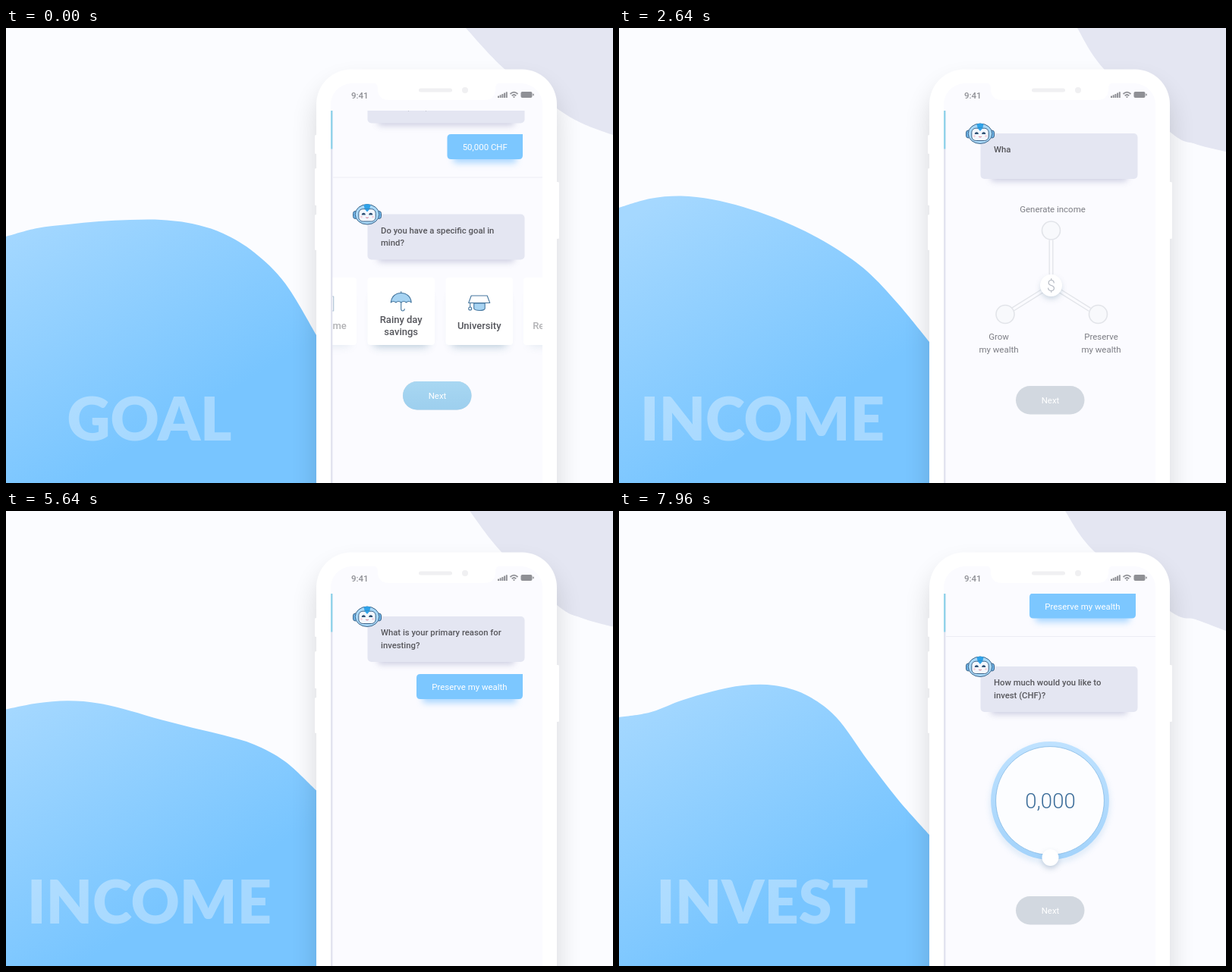
An HTML page that plays this animation: 800x600 px, repeating every 8 s.

```html
<!DOCTYPE html>
<html lang="en">
<head>
<meta charset="utf-8">
<title>Investment onboarding chat</title>
<style>
  html, body { margin: 0; width: 100%; height: 100%; overflow: hidden; background: #fbfcff; }
  svg { display: block; width: 800px; height: 600px; }
  text { font-family: Roboto, sans-serif; font-size: 11.45px; white-space: pre; }
  .mid { text-anchor: middle; }
  .question { fill: #57575c; font-weight: 500; font-size: 11.3px; }
  .white { fill: #fff; }
  .card { fill: #55565c; font-size: 13px; font-weight: 500; }
  .label { fill: #7c7d84; }
  .title { font-family: Lato, sans-serif; font-weight: 900; font-size: 79px; fill: #fff; }
  .icon { fill: none; stroke: #46779f; stroke-width: 1.1; stroke-linejoin: round; stroke-linecap: round; }
  .icon .tint { fill: #a6d3f2; }
</style>
</head>
<body>
<svg id="stage" viewBox="0 0 800 600"></svg>
<script>
const LOOP = 8000, STEP = 4540;            // STEP: delay between the two page changes
const SCROLLS = [286, 106.5];
const QUESTIONS = {
  invest: ['How much would you like to', 'invest (CHF)?'],
  goal: ['Do you have a specific goal in', 'mind?'],
  reason: ['What is your primary reason for', 'investing?'],
};

// ---- markup helpers ----
const text = (x, y, cls, str, extra = '') => `<text x="${x}" y="${y}" class="${cls}" ${extra}>${str}</text>`;
const rect = (x, y, w, h, r, fill, extra = '') =>
  `<rect x="${x}" y="${y}" width="${w}" height="${h}" rx="${r}" fill="${fill}" ${extra}/>`;
const circle = (x, y, r, fill, extra = '') => `<circle cx="${x}" cy="${y}" r="${r}" fill="${fill}" ${extra}/>`;
const group = (id, body) => `<g id="${id}">${body}</g>`;
const divider = (y, id) => rect(431, y - .5, 276, 1, 0, '#ededf5', id ? `id="${id}"` : '');

const question = (y, lines, id) =>
  rect(490, y + 46, 180, 17, 4, '#8487b4', 'opacity=".4" filter="url(#blur4)"') +
  rect(476.5, y, 207, 60, 5, '#e4e6f2') +
  lines.map((line, i) => text(494, y + 25 + 16.5 * i, 'question', line, id ? `id="${id}${i}"` : '')).join('') +
  `<use href="#robot" x="476" y="${y}"/>`;

const bubble = (y, w, str) => {
  const x = 681 - w;
  return rect(x + 8, y + 14, w - 16, 24, 4, '#5cb4ff', 'opacity=".5" filter="url(#blur4)"') +
    `<path d="M${x + 5} ${y}H681V${y + 28}q0 5-5 5H${x + 5}q-5 0-5-5V${y + 5}q0-5 5-5z" fill="#7cc7ff"/>` +
    text(x + w / 2, y + 21, 'white mid', str);
};

const nextButton = (y, blue, id = '') =>
  rect(523, y, 90.5, 37.5, 18.75, '#d2d8e0') +
  rect(523, y, 90.5, 37.5, 18.75, 'url(#button)', `id="${id}" opacity="${blue}"`) +
  text(568.5, y + 23.3, 'white mid', 'Next');

const card = (x, lines, icon, faded) =>
  rect(x + 8, 352, 72, 68, 4, '#5f8aa6', `opacity="${faded ? .15 : .45}" filter="url(#blur6)"`) +
  rect(x, 329, 88.5, 89, 4, '#fff') +
  `<g opacity="${faded ? .45 : 1}"><g class="icon" transform="translate(${x + 44.2} 361)">${icon}</g>` +
  lines.map((line, i) => text(x + 44.2, 399.5 - 8 * lines.length + 16 * i + 5.5, 'card mid', line)).join('') + '</g>';

const ICONS = {
  house: '<path d="M-14-7H14V12H-14z"/>',
  umbrella: '<path class="tint" d="M-13.5 1C-13-7-7-11.500 0-11.500S13-7 13.500 1q-3.300-3-6.700 0Q3.500-2 0 1q-3.500-3-6.800 0-3.400-3-6.700 0z"/><path d="M0-13.500v2M0 1V9.500q0 2.500 2.200 2.500T4.500 9.500"/>',
  cap: '<path class="tint" d="M-7 2H7.500V9q-1 2.500-7 2.500T-7 9z"/><path fill="#fff" d="M-10.500-8H10.500L14 1.500H-14z"/><path d="M-12 2v5"/><circle cx="-12" cy="9" r="2"/>',
};

const hub = [569.5, 339.5], goalNode = [633, 378];
const rails = [[0, -1], [-.848, .53], [.848, .53]].map(([dx, dy]) => {
  const line = side => {
    const ox = -dy * side, oy = dx * side;
    return `M${hub[0] + dx * 14 + ox} ${hub[1] + dy * 14 + oy}L${hub[0] + dx * 60 + ox} ${hub[1] + dy * 60 + oy}`;
  };
  return `<path d="${line(2.3)}${line(-2.3)}" stroke="#e3e5ea" stroke-width="1.4"/>`;
}).join('');
const socket = (x, y) => circle(x, y, 12, '#f8f9fc', 'stroke="#e2e4e9" stroke-width="1.6"');

const diagram =
  rails + socket(569.5, 267) + socket(509, 377.5) + socket(631.5, 377.5) + socket(569.5, 340) +
  `<path id="rail" stroke="url(#railBlue)" stroke-width="6"/>` +
  `<circle id="hubBlue" cx="569.5" cy="340" r="12" fill="#d8e9f7" stroke="#a5c8e4" stroke-width="1.6"/>` +
  group('knob', circle(0, 4, 13, '#7895ad', 'opacity=".45" filter="url(#blur4)"') + circle(0, 0, 14.5, '#fff') +
    text(0, 7, 'mid', '$', 'style="font-size:20px;font-weight:300" fill="#b4b9c2"')) +
  text(571.5, 242.5, 'label mid', 'Generate income') +
  text(500.5, 411, 'label mid', 'Grow') + text(500.5, 427.5, 'label mid', 'my wealth') +
  `<g id="preserve">${text(635.5, 411, 'mid', 'Preserve')}${text(635.5, 427.5, 'mid', 'my wealth')}</g>` +
  nextButton(472, 0, 'nextBlue');

const dial =
  circle(568, 386, 75, 'none', 'stroke="#7fb4e0" stroke-width="5" opacity=".4" filter="url(#blur4)"') +
  circle(568, 382, 72, '#fcfdff') +
  circle(568, 382, 74.6, 'none', 'stroke="url(#ring)" stroke-width="6.6"') +
  circle(568, 382, 71.4, 'none', 'stroke="#79b3e2" stroke-width="1" opacity=".7"') +
  circle(568.5, 461, 10, '#56779a', 'opacity=".4" filter="url(#blur4)"') + circle(568.5, 457, 11, '#fff') +
  text(568.5, 392, 'mid', '0,000', 'style="font-size:27.500px;font-weight:300" fill="#3b6c99"') +
  nextButton(508, 0);

const gradient = (id, coords, from, to, units = 'userSpaceOnUse') => {
  const [x1, y1, x2, y2] = coords;
  return `<linearGradient id="${id}" gradientUnits="${units}" x1="${x1}" y1="${y1}" x2="${x2}" y2="${y2}">` +
    `<stop stop-color="${from}"/><stop offset="1" stop-color="${to}"/></linearGradient>`;
};
const blur = n => `<filter id="blur${n}" x="-60%" y="-100%" width="220%" height="300%"><feGaussianBlur stdDeviation="${n}"/></filter>`;

const robot = group('robot',
  `<g stroke="#3d6489" stroke-width="1">` +
  `<rect x="-18.500" y="-4" width="6" height="10" rx="3" fill="#6fb6ea"/><rect x="12.500" y="-4" width="6" height="10" rx="3" fill="#6fb6ea"/>` +
  `<ellipse cy=".3" rx="15.800" ry="13.200" fill="#a9d8f7"/>` +
  `<path d="M-4.500-12.300Q0-14 4.500-12.300L3.200-6.500 0-3.500-3.200-6.500z" fill="#2fa2e8" stroke="none"/>` +
  `<rect x="-11.200" y="-6.800" width="22.400" height="16.300" rx="5.500" fill="#f3f7fd"/></g>` +
  `<path d="M-3.500-7H3.500L0-3z" fill="#2fa2e8"/>` +
  `<path d="M-7.200 1a2.500 2.800 0 0 1 5 0zM2.200 1a2.500 2.800 0 0 1 5 0z" fill="#2d4f73"/>` +
  `<path d="M-1.800 4.200q1.800 1.700 3.600 0" fill="none" stroke="#d0718d" stroke-width="1"/>` +
  circle(-7.5, 3.5, 1.3, '#f6cbd6') + circle(7.5, 3.5, 1.3, '#f6cbd6'));

const statusBar = text(455, 92.500, '', '9:41', 'fill="#8f9095" style="font-weight:500;font-size:11.500px"') +
  [0, 1, 2, 3, 4].map(i => rect(648 + 2.7 * i, 89.5 - 1.3 * i, 2, 2.5 + 1.3 * i, .5, '#8f9095')).join('') +
  `<g fill="none" stroke="#8f9095" stroke-width="1.700"><path d="M664.500 87q5-4.600 10 0M666.700 89.300q2.800-2.600 5.600 0"/></g>` +
  circle(669.5, 91, 1.1, '#8f9095') +
  rect(678.5, 84, 15, 8, 2, '#8f9095') + rect(694.3, 86.5, 1.4, 3, .7, '#8f9095');

const phone =
  rect(411, 76, 313, 600, 46, '#000', 'opacity=".16" filter="url(#blur18)"') +
  [[407, 141, 25], [407, 185, 49], [407, 246, 47], [724, 203, 75]].map(([x, y, h]) => rect(x, y, 5, h, 1.5, '#fff')).join('') +
  rect(409, 54.5, 317, 640, 46, '#fff') +
  rect(428, 73, 279, 640, 28, '#fbfbff') +
  `<path d="M484 72q6 1 6 8 0 15 15 15H630q15 0 15-15 0-7 6-8z" fill="#fff"/>` +
  rect(544, 79.500, 44, 5, 2.5, '#f0f0f2') + circle(605, 82, 4, '#f0f0f2') + statusBar;

document.getElementById('stage').innerHTML =
  `<defs>${robot}${blur(4)}${blur(6)}${blur(18)}` +
  gradient('sea', [0, 260, 175, 551], '#a5d8ff', '#78c5ff') +
  gradient('button', [0, 0, 0, 1], '#a8d7f2', '#9dcfee', 'objectBoundingBox') +
  gradient('ring', [0, 304, 0, 460], '#bfe2ff', '#a3d3fb') +
  gradient('railBlue', [...hub, ...goalNode], '#b5daf7', '#73bbfa') +
  `<clipPath id="view"><rect x="428" y="109" width="279" height="491"/></clipPath></defs>` +
  `<rect width="800" height="600" fill="#fbfcff"/>` +
  `<path id="cloud" fill="#e4e6f2"/><path id="hill" fill="url(#sea)"/>` +
  ['GOAL', 'INCOME', 'INVEST'].map((word, i) => text(189, 544, 'title mid', word, `id="title${i}"`)).join('') +
  phone +
  `<g clip-path="url(#view)"><g id="pages">` +
    question(65.5, QUESTIONS.invest) + bubble(140, 99.5, '50,000 CHF') + divider(197) +
    question(245.5, QUESTIONS.goal) +
    group('cards',
      card(373.5, ['New home'], ICONS.house, true) + card(682, ['Retirement'], ICONS.house, true) +
      card(476.5, ['Rainy day', 'savings'], ICONS.umbrella) + card(579.5, ['University'], ICONS.cap) +
      nextButton(466, 1)) +
    group('answer0', bubble(320, 93, 'University')) + divider(377, 'divider0') +
    `<g transform="translate(0 ${SCROLLS[0]})">` +
      group('ask0', question(139, QUESTIONS.reason, 'reason')) + group('diagram', diagram) +
      group('answer1', bubble(215, 140, 'Preserve my wealth')) + divider(272, 'divider1') +
    `</g><g transform="translate(0 ${SCROLLS[0] + SCROLLS[1]})">` +
      group('ask1', question(205, QUESTIONS.invest, 'invest')) + group('dial', dial) +
    `</g></g>` +
    rect(428, 109, 2.4, 491, 0, '#e2e3ef') + rect(428, 109, 2.4, 50.5, 0, '#92d3ea') + `</g>`;

// ---- motion ----
const $ = id => document.getElementById(id);
const easeInOut = p => p < .5 ? 2 * p * p : 1 - 2 * (1 - p) ** 2;
const ramp = (t, start, length) => easeInOut(Math.min(1, Math.max(0, (t - start) / length)));
const show = (id, opacity, dy = 0, dx = 0) => {
  $(id).setAttribute('opacity', opacity);
  $(id).setAttribute('transform', `translate(${dx} ${dy})`);
};

const KEY_TIMES = [0, 1120, 2640, 3520, 4960, 6320, 7960];
// Heights of the hill's edge at even steps across 0..409
const HILL = [
  [275, 264, 259, 255, 253, 253, 258, 271, 296, 337, 405],
  [252, 246, 244.5, 247, 250.5, 256, 268, 288, 318, 355, 398],
  [237, 225, 221.5, 226, 236, 250, 268, 291, 321, 364, 414],
  [271, 261, 258.5, 261, 268, 279, 296, 317, 346, 385, 433],
  [257, 251, 249.5, 252.5, 261, 271, 281, 292, 308, 332, 367],
  [268, 258, 252, 254, 263, 275.5, 287, 299, 314, 340, 383],
  [272, 265.5, 250, 238, 230, 230, 242, 272, 328, 381, 427],
];
// Cloud edge: x at y=0 and y=54, then y at x=726, 760 and 800
const CLOUD = [
  [606, 657, 106, 126, 141], [604, 643, 128, 141, 148], [604, 639, 137, 153, 163], [613, 642, 146, 160, 164],
  [609, 654, 119, 138, 154], [611, 648, 132, 147, 153], [588, 627, 132, 143, 158],
];

// Hermite interpolation through the key shapes
function morph(keys, t) {
  let i = 0;
  while (i < KEY_TIMES.length - 2 && t > KEY_TIMES[i + 1]) i++;
  const span = KEY_TIMES[i + 1] - KEY_TIMES[i], p = Math.min(1, (t - KEY_TIMES[i]) / span);
  const slope = (k, n) => {
    const a = Math.max(0, k - 1), b = Math.min(keys.length - 1, k + 1);
    return (keys[b][n] - keys[a][n]) / (KEY_TIMES[b] - KEY_TIMES[a]) * span;
  };
  return keys[i].map((from, n) => {
    const to = keys[i + 1][n], q = 1 - p;
    return from * q * q * (1 + 2 * p) + to * p * p * (3 - 2 * p) + slope(i, n) * p * q * q - slope(i + 1, n) * p * p * q;
  });
}

function smoothPath(points) {
  const at = i => points[Math.max(0, Math.min(points.length - 1, i))];
  return points.slice(1).reduce((d, end, i) => {
    const start = at(i), before = at(i - 1), after = at(i + 2);
    const c1 = start.map((v, k) => v + (end[k] - before[k]) / 6);
    const c2 = end.map((v, k) => v - (after[k] - start[k]) / 6);
    return `${d}C${c1} ${c2} ${end}`;
  }, `M${points[0]}`);
}

function type(id, lines, count) {
  lines.forEach((line, i) => {
    $(id + i).textContent = line.slice(0, Math.max(0, count));
    count -= line.length;
  });
}

function draw(t) {
  const hill = morph(HILL, t).map((y, i) => [i * 40.9, y]);
  $('hill').setAttribute('d', smoothPath(hill) + 'L440 480V600H0Z');
  const [x0, x1, y2, y3, y4] = morph(CLOUD, t);
  $('cloud').setAttribute('d', smoothPath([[x0, 0], [x1, 54], [726, y2], [760, y3], [800, y4]]) + 'V0Z');

  let scroll = 0;
  const leave = [], enter = [];
  [0, 1].forEach(i => {
    const local = t - i * STEP;
    scroll += SCROLLS[i] * ramp(local, 1540, 690);
    leave[i] = ramp(local, 1620, 400);
    enter[i + 1] = ramp(local, 2120, 440);
    const answer = ramp(local, 840, 240), ask = ramp(local, 2220, 320), fadeOut = 1 - ramp(local, 480, 300);
    show('answer' + i, answer, 10 * (1 - answer));
    show('divider' + i, ramp(local, 1300, 240));
    show('ask' + i, ask, 12 * (1 - ask));
    const controls = ramp(local, 2280, 340);
    show(['diagram', 'dial'][i], controls * (i ? 1 : 1 - ramp(t, 480 + STEP, 300)), 8 * (1 - controls));
    if (!i) show('cards', fadeOut);
    type(['reason', 'invest'][i], [QUESTIONS.reason, QUESTIONS.invest][i], Math.floor((local - 2589) / 17));
  });
  show('pages', 1, -scroll);

  [0, 1, 2].forEach(i => {
    const inP = i ? enter[i] : 1, outP = leave[i] || 0;
    show('title' + i, .34 * inP * (1 - outP), 25 * (1 - inP) - 30 * outP);
  });

  const drag = ramp(t, 4220, 480), chosen = ramp(t, 4560, 300);
  const [kx, ky] = hub.map((v, k) => v + (goalNode[k] - v) * drag);
  show('knob', 1, ky, kx);
  $('rail').setAttribute('d', `M${hub}L${kx} ${ky}`);
  show('hubBlue', drag);
  show('nextBlue', chosen);
  $('preserve').setAttribute('fill', `rgb(${[124, 125, 132].map(c => c - 42 * chosen)})`);
}

function frame() {
  draw(performance.now() % LOOP);
  requestAnimationFrame(frame);
}
frame();
</script>
</body>
</html>
```
